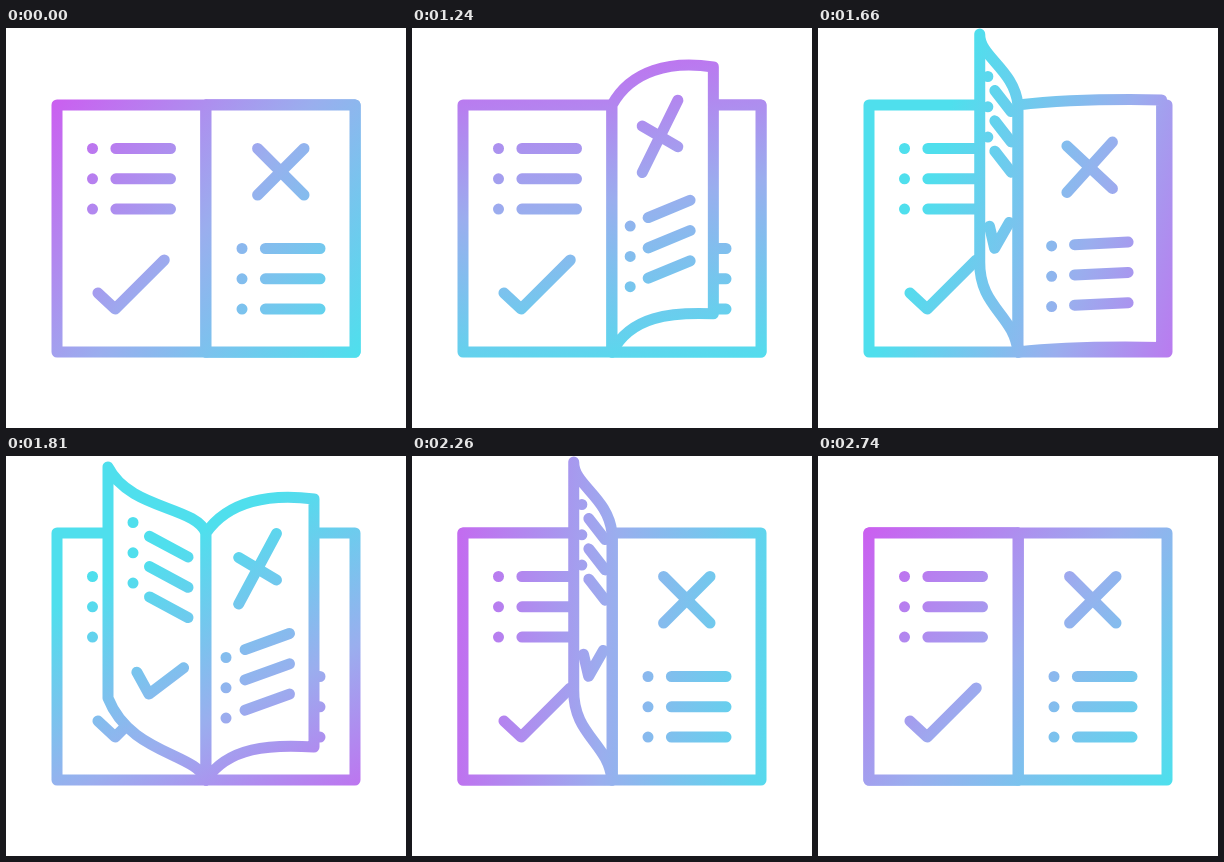
An HTML page for the animation above (2.77 s loop, 400 px wide and 400 px high).

```html
<!DOCTYPE html>
<html lang="en">
<head>
<meta charset="utf-8">
<title>Book</title>
<style>
  html, body { margin: 0; width: 100%; height: 100%; overflow: hidden; background: #fff; }
  svg { display: block; width: 100%; height: 100%; }
</style>
</head>
<body>
<svg viewBox="0 0 400 400" fill="none" stroke="url(#ink)" stroke-width="11" stroke-linecap="round" stroke-linejoin="round">
  <defs>
    <linearGradient id="ink" gradientUnits="userSpaceOnUse">
      <stop offset="0" stop-color="#ca60f0"/>
      <stop offset=".5" stop-color="#9aaeee"/>
      <stop offset="1" stop-color="#4fdfed"/>
    </linearGradient>
  </defs>
</svg>
<script>
const LOOP = 2770, STEP = 30, FIRST_STEP = 1030;
const START = 1000, PAGE_DELAY = 600, PAGE_TIME = 1130, SPIN_TIME = 1470;
const SPINE = 200, TOP = 77, BOTTOM = 324;
const svg = document.querySelector('svg');
const ink = document.getElementById('ink');

// A pose holds offsets from the spine and from the flat page: two curve
// controls and the corner, then the near and far ends of the printed marks.
const pose = (at, x, top, bottom, marksX, marksY) =>
  ({ at, values: [...x, ...top, ...bottom, ...marksX, ...marksY] });
const flat = (at, side, marksX) =>
  pose(at, [50 * side, 100 * side, 149 * side], [0, 0, 0], [0, 0, 0], marksX, [0, 0]);

const POSES = [
  flat(0, 1, [36, 114]),
  pose(210, [22, 64, 108], [-32, -40, -34], [-33, -36, -33], [20, 83.5], [-19, -43]),
  pose(480, [1, 12, 39], [-41, -71, -62], [-44, -60, -79], [6.5, 26], [-50, -79.5]),
  pose(810, [-10, -76, -98], [-27, -23, -66], [-27, -26, -82], [-18, -73], [-19.5, -54]),
  flat(PAGE_TIME, -1, [-35.5, -113.5])
];

// Smooth curve through the poses, at rest at both ends
function poseAt(time) {
  const last = POSES.length - 1;
  if (time <= 0) return POSES[0].values;
  if (time >= PAGE_TIME) return POSES[last].values;
  const i = POSES.findIndex(p => p.at > time) - 1;
  const span = k => POSES[k + 1].at - POSES[k].at;
  const rate = (k, c) => (POSES[k + 1].values[c] - POSES[k].values[c]) / span(k);
  const slope = (k, c) => k === 0 || k === last ? 0 :
    (rate(k - 1, c) * span(k) + rate(k, c) * span(k - 1)) / (span(k) + span(k - 1));
  const h = span(i), u = (time - POSES[i].at) / h, v = 1 - u;
  return POSES[i].values.map((a, c) =>
    a * v * v * (1 + 2 * u) + POSES[i + 1].values[c] * u * u * (3 - 2 * u) +
    h * u * v * (slope(i, c) * v - slope(i + 1, c) * u));
}

function outline([x1, x2, x3, t1, t2, t3, b1, b2, b3]) {
  const p = (x, y) => `${SPINE + x} ${y} `;
  return `M${p(0, TOP)}C${p(x1, TOP + t1)}${p(x2, TOP + t2)}${p(x3, TOP + t3)}` +
    `L${p(x3, BOTTOM + b3)}C${p(x2, BOTTOM + b2)}${p(x1, BOTTOM + b1)}${p(0, BOTTOM)}Z`;
}

function marks(values) {
  const [near, far, nearY, farY] = values.slice(9);
  const recto = values[2] >= 0;
  const p = (across, lift, y) =>
    `${SPINE + near + (far - near) * across} ${y + nearY + (farY - nearY) * lift} `;
  let d = '';
  for (let row = 0; row < 3; row++) {
    const y = (recto ? 220.5 : 120.5) + row * 30.3;
    d += recto
      ? `M${p(0, 0, y)}h.01M${p(.3, .33, y)}L${p(1, 1, y)}`
      : `M${p(1, 1, y)}h.01M${p(.7, .6, y)}L${p(0, 0, y)}`;
  }
  return d + (recto
    ? `M${p(.2, 0, 120.5)}L${p(.795, 1, 167)}M${p(.795, 1, 120.5)}L${p(.2, 0, 167)}`
    : `M${p(.93, .85, 265)}L${p(.71, .68, 281)}L${p(.08, .02, 232)}`);
}

function addNode(parent, name, fill) {
  const node = document.createElementNS('http://www.w3.org/2000/svg', name);
  if (fill) node.setAttribute('fill', fill);
  return parent.appendChild(node);
}

function addPage(time) {
  const group = addNode(svg, 'g');
  const sheet = addNode(group, 'path', '#fff'), print = addNode(group, 'path', 'none');
  const draw = t => {
    const values = poseAt(t);
    sheet.setAttribute('d', outline(values));
    print.setAttribute('d', marks(values));
  };
  draw(time);
  return { group, draw };
}

addPage(0);
addPage(PAGE_TIME);
const first = addPage(0), second = addPage(0);

function spinInk(time) {
  const u = Math.min(1, Math.max(0, time / SPIN_TIME));
  const turn = (u + u * u * (3 - 2 * u)) / 2;
  const angle = (-140 + 360 * turn) * Math.PI / 180;
  const swell = Math.sin(Math.PI * u);
  const half = (395 - 50 * swell) / 2;
  const shift = 135 * swell * swell * (1 - u);
  [shift + half, shift - half].forEach((r, i) => {
    ink.setAttribute(`x${i + 1}`, 200 + Math.cos(angle) * r);
    ink.setAttribute(`y${i + 1}`, 200.5 + Math.sin(angle) * r);
  });
}

function render(time) {
  const stepped = FIRST_STEP + Math.floor((time - FIRST_STEP) / STEP + .001) * STEP;
  const t = Math.max(0, stepped - START);
  const moving = time < FIRST_STEP ? 0 : t;
  first.draw(moving);
  second.draw(moving - PAGE_DELAY);
  // The first page covers the second on the right and is covered on the left
  svg.append((moving < PAGE_DELAY ? first : second).group);
  spinInk(moving);
}

const start = performance.now();
function tick() {
  render((performance.now() - start) % LOOP);
  requestAnimationFrame(tick);
}
tick();
</script>
</body>
</html>
```
